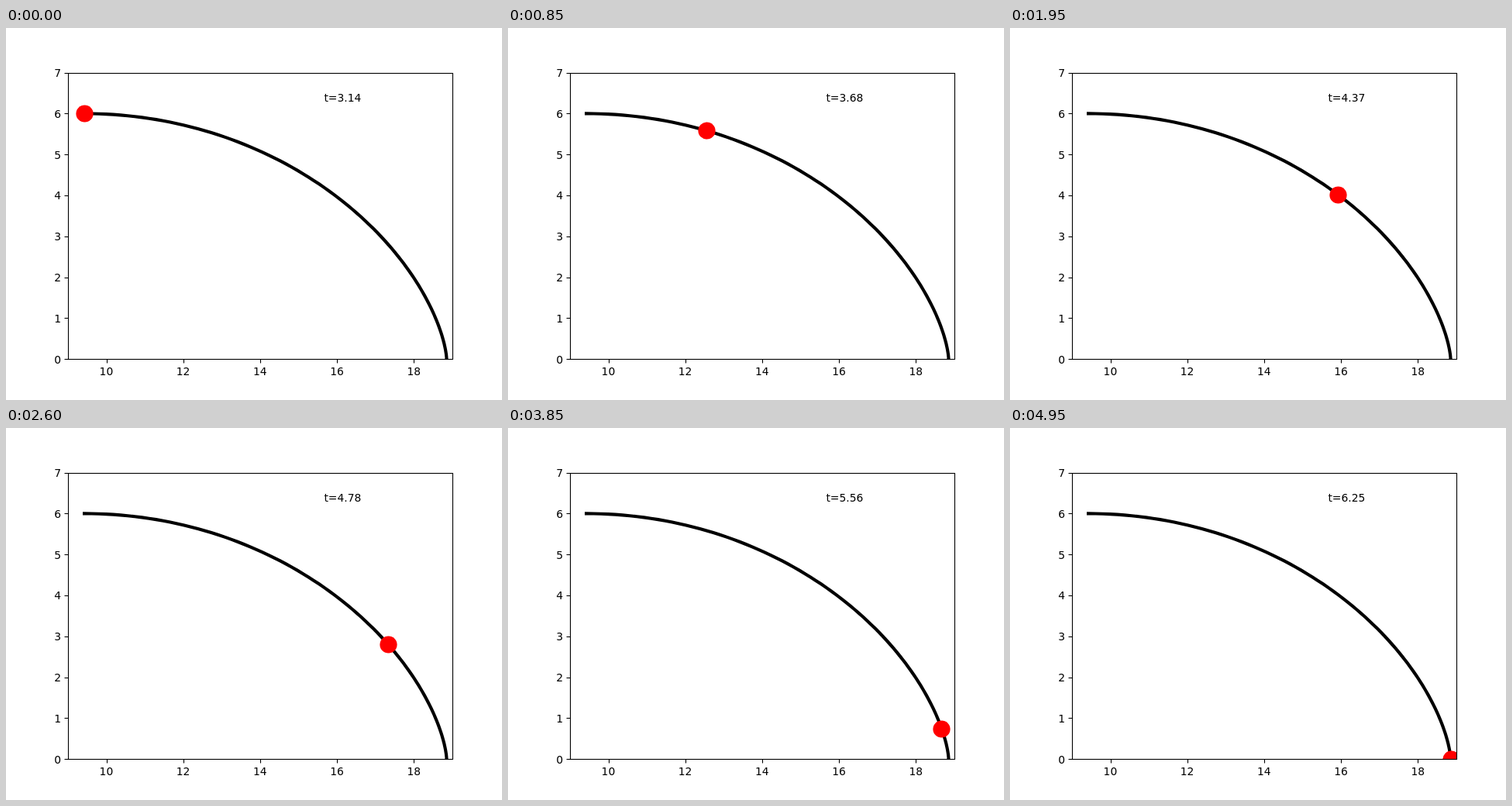
Write an HTML page that moves like this. It is 640 px wide and 480 px high and loops after 5000 ms.

```html
<!DOCTYPE html>
<html lang="en">
<head>
<meta charset="utf-8">
<title>Cycloid slide</title>
<style>
  html, body { margin: 0; width: 100%; height: 100%; overflow: hidden; background: #fff; }
  svg { display: block; width: 640px; height: 480px; }
  text { font: 13.889px "DejaVu Sans", sans-serif; white-space: pre; }
</style>
</head>
<body>
<svg id="stage" viewBox="0 0 640 480">
  <defs><clipPath id="area"><rect x="80" y="58" width="496" height="369"/></clipPath></defs>
  <rect width="640" height="480" fill="#fff"/>
  <g clip-path="url(#area)">
    <path id="curve" fill="none" stroke="#000" stroke-width="4.167" stroke-linecap="square" stroke-linejoin="round"/>
    <circle id="ball" r="11.11" fill="#f00"/>
  </g>
  <g id="axes" stroke="#000" stroke-width="1.11" fill="none">
    <rect x="80.5" y="58.5" width="496" height="369"/>
  </g>
  <g id="labels"></g>
  <text id="clock" x="410.4" y="95"></text>
</svg>
<script>
const STEPS = 100, STEP_MS = 50, R = 3;
const $ = id => document.getElementById(id);
const px = x => 80 + (x - 9) * 49.6;
const py = y => 427.2 - y * 52.8;
const snap = v => Math.round(v) + 0.5;
const angle = i => Math.PI * (1 + i / STEPS);
const cycloid = t => [px(R * (t - Math.sin(t))), py(R * (1 - Math.cos(t)))];

function add(parent, tag, attrs, text = "") {
  const el = document.createElementNS("http://www.w3.org/2000/svg", tag);
  for (const k in attrs) el.setAttribute(k, attrs[k]);
  el.textContent = text;
  $(parent).appendChild(el);
}

function buildAxes() {
  for (let x = 10; x <= 18; x += 2) {
    add("axes", "path", { d: `M${snap(px(x))} 427.5v5` });
    add("labels", "text", { x: px(x) - 9, y: 448 }, x);
  }
  for (let y = 0; y <= 7; y++) {
    add("axes", "path", { d: `M80.5 ${snap(py(y))}h-5` });
    add("labels", "text", { x: 62.2, y: Math.round(py(y) + 5.4) }, y);
  }
}

function buildCurve() {
  const pts = Array.from({ length: STEPS + 1 }, (_, i) =>
    cycloid(angle(i)).map(v => v.toFixed(2)).join(" "));
  $("curve").setAttribute("d", "M" + pts.join("L"));
}

function draw(ms) {
  const t = angle(Math.floor(ms / STEP_MS) % STEPS);
  const [x, y] = cycloid(t);
  $("ball").setAttribute("cx", snap(x));
  $("ball").setAttribute("cy", snap(y));
  $("clock").textContent = "t=" + t.toFixed(2);
}

buildAxes();
buildCurve();
draw(0);
const start = performance.now();
(function tick() {
  draw(performance.now() - start);
  requestAnimationFrame(tick);
})();
</script>
</body>
</html>
```
